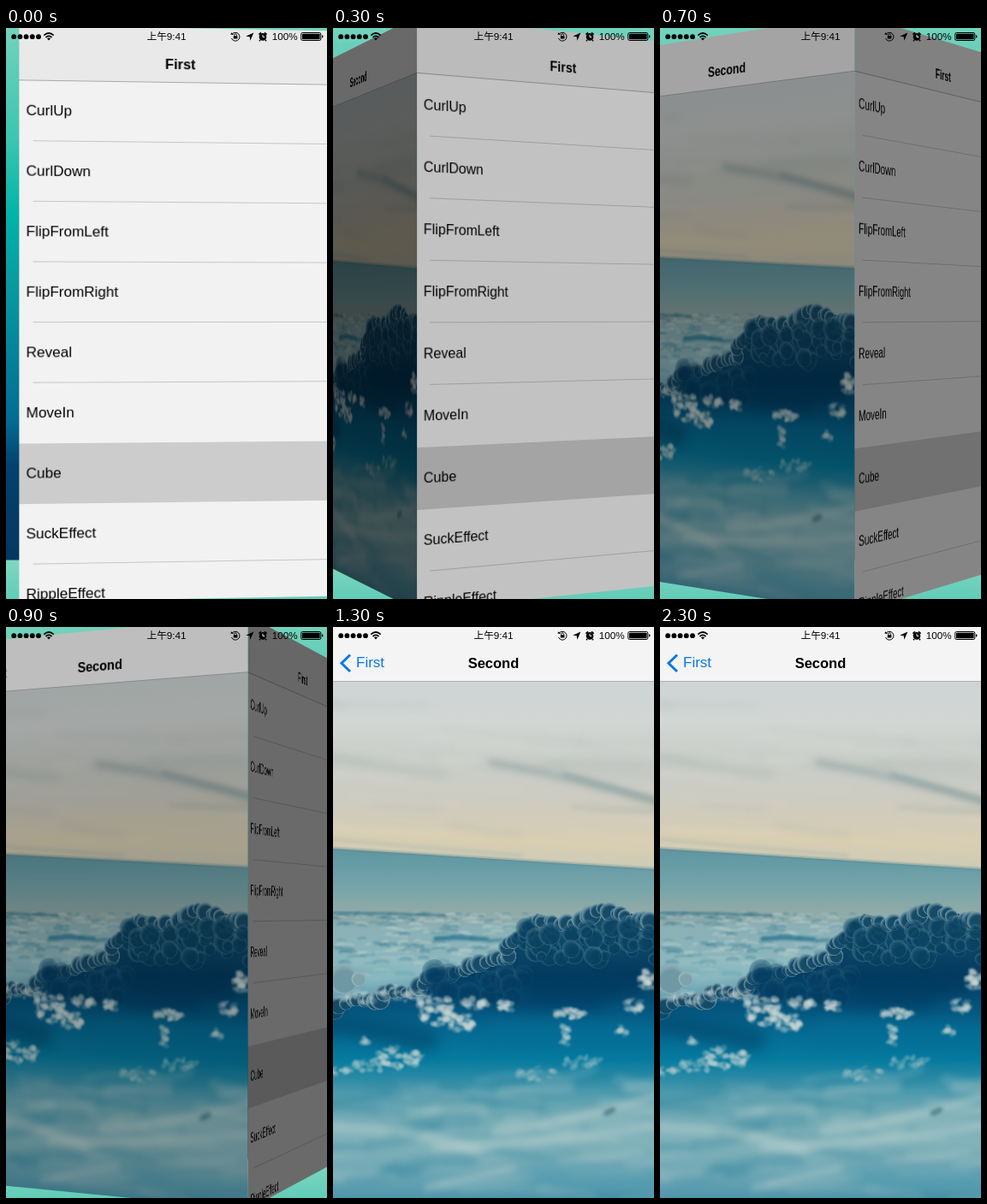
These frames come from a looping animation (375 by 667 pixels, 2.4 s). An HTML page with a canvas:

```html
<!DOCTYPE html>
<html lang="en">
<head>
<meta charset="utf-8">
<title>Cube transition</title>
<style>
html, body { margin: 0; width: 100%; height: 100%; overflow: hidden; }
body { font: 17px/1 "Liberation Sans", "Noto Sans CJK SC", "Noto Sans CJK", Arial, sans-serif; color: #000; }
#stage {
  position: absolute; left: 0; top: 0; width: 375px; height: 667px; overflow: hidden;
  background: linear-gradient(#73d2bc 0, #3cc5b0 130px, #00b3a8 220px, #0a9aa0 300px, #05839a 380px,
    #046b94 460px, #03426f 510px, #04375f 621px, #7fd8c0 622px, #62ccb8 667px);
}
.face { position: absolute; inset: 0; overflow: hidden; background: #fcfdfc; backface-visibility: hidden; }
.nav { position: absolute; left: 0; top: 0; width: 375px; height: 64px; box-sizing: border-box;
  background: #f3f4f3; border-bottom: 1px solid #b0b2b2; }
.title { position: absolute; left: 0; right: 0; top: 20px; text-align: center; font-weight: bold;
  font-size: 16.5px; line-height: 44px; }
.back { position: absolute; left: 27px; top: 20px; line-height: 44px; color: #0a78e6; }
.chevron { position: absolute; left: 0; top: 20px; }
.row { position: absolute; left: 0; width: 375px; height: 70px; line-height: 70px; text-indent: 8px; }
.row.line::after { content: ""; position: absolute; left: 16px; right: 0; bottom: 0; height: 1px; background: #cdcfce; }
.row.on { background: #d5d6d5; }
#photo { position: absolute; left: 0; top: 0; }
#status { position: absolute; left: 0; top: 0; }
</style>
</head>
<body>
<div id="stage">
  <div class="face" id="first">
    <div class="nav"><div class="title">First</div></div>
  </div>
  <div class="face" id="second">
    <canvas id="photo" width="375" height="667"></canvas>
    <div class="nav">
      <svg class="chevron" width="30" height="44"><path d="M20 12.5L10 22.3L20 32" fill="none" stroke="#0a78e6" stroke-width="3"/></svg>
      <div class="back">First</div>
      <div class="title">Second</div>
    </div>
  </div>
  <svg id="status" width="375" height="20" font-size="11.7">
    <g id="dots"></g>
    <g fill="none" stroke="#000" stroke-width="1.7">
      <path d="M44.3 8.6Q50 3.4 55.7 8.6M46.5 11Q50 7.8 53.5 11"/>
    </g>
    <path d="M50 14.4L47.9 12.3Q50 10.6 52.1 12.3Z"/>
    <text x="187.5" y="14.3" text-anchor="middle">上午9:41</text>
    <g fill="none" stroke="#000">
      <path d="M264.2 7.2A4.9 4.9 0 1 1 263.5 12"/>
      <path d="M266.6 9.5V8.4A1.5 1.5 0 0 1 269.6 8.4V9.5" stroke-width=".9"/>
    </g>
    <path d="M262.2 7.4L266 8L263.6 5.2ZM265.8 9.3H270.4V12.6H265.8Z"/>
    <path d="M289.3 5.4L285.4 14.7L284.7 10.3L280.2 9.7Z"/>
    <circle cx="300" cy="10.4" r="4.3"/>
    <path d="M295.4 7.6L298 5.3M304.6 7.6L302 5.3M297 14L296 15.2M303 14L304 15.2" stroke="#000" stroke-width="1.6"/>
    <path d="M300 7.8V10.6H302.3" stroke="#f3f4f3" fill="none"/>
    <text x="310.8" y="14.3">100%</text>
    <rect x="344.8" y="5.5" width="23" height="9" rx="1.6" fill="none" stroke="#000"/>
    <rect x="346" y="6.7" width="20.6" height="6.6" rx=".6"/>
    <path d="M369 8.3Q370.6 8.6 370.6 10T369 11.7Z"/>
  </svg>
</div>
<script>
const $ = id => document.getElementById(id);
const first = $("first"), second = $("second");

const names = ["CurlUp", "CurlDown", "FlipFromLeft", "FlipFromRight", "Reveal", "MoveIn", "Cube", "SuckEffect", "RippleEffect"];
names.forEach((name, i) => {
  const row = document.createElement("div");
  row.className = "row" + (name === "Cube" ? " on" : name === "MoveIn" ? "" : " line");
  row.style.top = 64 + i * 70 + "px";
  row.textContent = name;
  first.append(row);
});
$("dots").innerHTML = [0, 1, 2, 3, 4].map(i => `<circle cx="${9.2 + i * 7.2}" cy="10.2" r="2.9"/>`).join("");

// Sky and clouds
const ctx = $("photo").getContext("2d");
let seed = 11;
const rand = (a = 0, b = 1) => {
  seed = (seed * 16807) % 2147483647;
  return a + (b - a) * seed / 2147483647;
};

function fade(y0, y1, ...stops) {
  const g = ctx.createLinearGradient(0, y0, 0, y1);
  stops.forEach(([y, c]) => g.addColorStop((y - y0) / (y1 - y0), c));
  return g;
}

function streak(x0, y0, x1, y1, bend, width, color, blur) {
  ctx.filter = `blur(${blur}px)`;
  ctx.strokeStyle = color;
  ctx.lineWidth = width;
  ctx.lineCap = "round";
  ctx.beginPath();
  ctx.moveTo(x0, y0);
  ctx.quadraticCurveTo((x0 + x1) / 2, (y0 + y1) / 2 + bend, x1, y1);
  ctx.stroke();
  ctx.filter = "none";
}

// Ball of cloud lit from the upper left
function puff(x, y, r, light, dark) {
  const g = ctx.createRadialGradient(x + r * .25, y + r * .4, r * .2, x, y, r);
  g.addColorStop(0, dark);
  g.addColorStop(.62, dark);
  g.addColorStop(.93, light);
  g.addColorStop(1, "rgba(120,160,172,0)");
  ctx.fillStyle = g;
  ctx.beginPath();
  ctx.arc(x, y, r, 0, 7);
  ctx.fill();
}

function wisp(x, y, w, h, n, alpha) {
  ctx.filter = "blur(1.2px)";
  for (let i = 0; i < n; i++) {
    const a = rand(0, 6.3), d = Math.sqrt(rand());
    ctx.fillStyle = `rgba(205,217,214,${alpha * rand(.4, 1)})`;
    ctx.beginPath();
    ctx.ellipse(x + Math.cos(a) * d * w, y + Math.sin(a) * d * h, rand(2, 6), rand(1.5, 4), rand(-.6, .6), 0, 7);
    ctx.fill();
  }
  ctx.filter = "none";
}

function paint() {
  ctx.fillStyle = fade(64, 667, [64, "#ced5d4"], [110, "#d2d6d4"], [160, "#c9cdc8"], [195, "#ccccc3"], [225, "#d2ccb9"],
    [250, "#d7ceb3"], [280, "#cfcbb7"], [340, "#8ca7a7"], [350, "#8bb0b5"], [390, "#8ab6bd"], [430, "#6aa4b4"],
    [465, "#0d7097"], [500, "#0a7d9f"], [530, "#368fa8"], [565, "#6fa9b4"], [600, "#82b3ba"], [635, "#71a9b6"], [667, "#4f96ac"]);
  ctx.fillRect(0, 64, 375, 603);

  for (let i = 0; i < 26; i++) {
    const x = rand(-60, 300), y = rand(80, 240);
    streak(x, y, x + rand(70, 170), y + rand(2, 16), rand(-5, 5), rand(3, 9),
      i % 2 ? "rgba(226,224,213,.22)" : "rgba(160,174,174,.16)", 4);
  }
  streak(185, 158, 390, 208, -6, 7, "rgba(125,149,152,.55)", 4);
  streak(270, 172, 390, 206, 0, 4, "rgba(104,136,143,.5)", 3);
  streak(0, 152, 130, 172, 5, 8, "rgba(160,172,170,.3)", 5);
  streak(280, 210, 390, 216, 3, 4, "rgba(150,162,158,.4)", 3);
  streak(0, 236, 375, 262, -3, 5, "rgba(226,213,174,.5)", 4);

  // Haze below the tilted horizon
  ctx.fillStyle = fade(257, 340, [257, "#60949e"], [275, "#659ba5"], [305, "#76a5a9"], [328, "#8da9a7"], [340, "#91adac"]);
  ctx.beginPath();
  ctx.moveTo(0, 259);
  ctx.quadraticCurveTo(190, 271, 375, 283);
  ctx.lineTo(375, 340);
  ctx.lineTo(0, 340);
  ctx.fill();
  streak(-5, 258, 380, 283, 0, 2, "rgba(74,127,140,.6)", 1);
  streak(-5, 248, 220, 267, 0, 2, "rgba(136,164,166,.5)", 2);

  // Distant sea of clouds
  for (let i = 0; i < 190; i++) {
    const d = rand(), y = 335 + d * d * 72, x = rand(-10, 225 - d * 50), w = rand(5, 10 + d * 16);
    streak(x, y, x + w, y + rand(-1, 1), -2, rand(1.5, 2 + d * 3),
      i % 2 ? "rgba(62,128,150,.45)" : "rgba(184,205,203,.5)", .8);
  }
  streak(120, 364, 180, 365, -3, 5, "rgba(32,112,142,.75)", 1.5);
  streak(0, 334, 130, 337, -2, 3, "rgba(66,122,138,.7)", 1);
  streak(20, 390, 150, 392, 4, 8, "rgba(165,201,203,.5)", 5);
  streak(40, 412, 110, 402, 0, 10, "rgba(150,195,200,.7)", 5);

  // Dark cumulus
  const crest = [[0, 440], [28, 428], [50, 432], [66, 419], [90, 424], [108, 405], [135, 401], [160, 391], [185, 383], [204, 382],
    [203, 364], [222, 351], [238, 335], [264, 342], [292, 336], [315, 325], [342, 333], [375, 342]];
  puff(12, 411, 18, "#8fb0b7", "#6f98a5");
  puff(30, 411, 9, "#9ab8bc", "#7fa3ad");
  ctx.fillStyle = fade(320, 540, [320, "#23536c"], [370, "#0d4767"], [405, "#053d62"], [440, "#05527b"], [475, "#066b93"],
    [505, "rgba(4,121,158,.8)"], [540, "rgba(40,140,165,0)"]);
  ctx.beginPath();
  ctx.moveTo(0, 540);
  crest.forEach(p => ctx.lineTo(...p));
  ctx.lineTo(375, 540);
  ctx.fill();
  for (let i = 1; i < crest.length; i++) {
    const [x0, y0] = crest[i - 1], [x1, y1] = crest[i];
    const n = Math.ceil(Math.hypot(x1 - x0, y1 - y0) / 8);
    for (let k = 0; k < n; k++) {
      const u = k / n, x = x0 + (x1 - x0) * u, y = y0 + (y1 - y0) * u;
      puff(x + rand(-2, 2), y + rand(3, 8), rand(6, 12), "rgba(119,158,170,.85)", "#164b68");
    }
  }
  for (let i = 0; i < 48; i++) {
    const x = rand(208, 375);
    puff(x, rand(349, 388), rand(6, 15), "rgba(66,116,137,.5)", "rgba(9,65,96,.75)");
  }
  for (let i = 0; i < 26; i++) puff(rand(115, 225), rand(402, 432), rand(8, 16), "rgba(35,90,120,.35)", "rgba(4,61,97,.6)");
  streak(235, 415, 350, 412, 8, 34, "rgba(2,58,94,.75)", 9);
  streak(0, 464, 110, 482, -4, 26, "rgba(3,76,114,.75)", 8);
  streak(120, 426, 310, 436, 6, 20, "rgba(2,63,101,.6)", 8);
  streak(190, 472, 385, 480, 0, 18, "rgba(4,112,153,.7)", 10);

  // Sunlit tufts
  wisp(78, 428, 26, 9, 28, .4);
  wisp(118, 446, 22, 18, 70, .55);
  wisp(148, 462, 20, 10, 44, .6);
  wisp(30, 434, 26, 7, 24, .4);
  wisp(166, 440, 15, 7, 26, .5);
  wisp(201, 443, 9, 6, 16, .6);
  wisp(276, 452, 16, 7, 24, .6);
  wisp(272, 476, 5, 12, 14, .5);
  wisp(337, 472, 6, 7, 10, .4);
  wisp(352, 443, 11, 9, 20, .5);
  wisp(366, 413, 9, 12, 26, .55);
  wisp(38, 483, 5, 4, 6, .4);
  wisp(76, 503, 26, 13, 55, .45);
  wisp(45, 512, 22, 7, 24, .35);
  wisp(8, 519, 12, 5, 15, .4);
  wisp(290, 508, 22, 7, 20, .35);
  wisp(235, 522, 24, 8, 24, .3);

  // Veils in front
  for (let i = 0; i < 60; i++) {
    const x = rand(-50, 350), y = rand(525, 670);
    streak(x, y, x + rand(40, 110), y + rand(-16, 12), rand(-9, 9), rand(3, 11),
      i % 3 ? "rgba(190,210,208,.25)" : "rgba(35,127,157,.3)", 4);
  }
  streak(190, 590, 385, 547, 6, 8, "rgba(206,217,211,.5)", 4);
  streak(0, 585, 170, 612, -14, 9, "rgba(204,217,213,.45)", 5);
  streak(120, 608, 385, 582, 8, 7, "rgba(200,215,213,.45)", 4);
  streak(110, 655, 210, 632, 0, 7, "rgba(188,208,208,.5)", 4);
  streak(230, 640, 380, 645, 0, 22, "rgba(62,146,172,.45)", 9);
  streak(319, 568, 327, 564, 0, 6, "rgba(62,114,130,.75)", 2);
}

// Turn of the cube: [ms, degrees]
const keys = [[0, 5], [300, 26.1], [700, 53.2], [1100, 77.1], [1300, 90]];
function angle(t) {
  const i = keys.findIndex(k => k[0] > t);
  if (i < 0) return 90;
  const [t0, a0] = keys[i - 1], [t1, a1] = keys[i];
  return a0 + (a1 - a0) * (t - t0) / (t1 - t0);
}

function turn(face, deg) {
  const away = Math.abs(deg);
  face.style.visibility = away > 89.9 ? "hidden" : "visible";
  face.style.transform = away ? `perspective(1600px) translateZ(-187.5px) rotateY(${deg}deg) translateZ(187.5px)` : "none";
  face.style.filter = away ? `brightness(${1 - .8 * away / 90})` : "none";
}

const loop = 2400, step = 100;
const start = performance.now();
let shown = -1;
function draw(now) {
  const t = Math.floor(Math.max(0, now - start) % loop / step) * step;
  if (t !== shown) {
    shown = t;
    const a = angle(t);
    turn(first, a);
    turn(second, a - 90);
  }
  requestAnimationFrame(draw);
}

paint();
draw(start);
</script>
</body>
</html>
```
